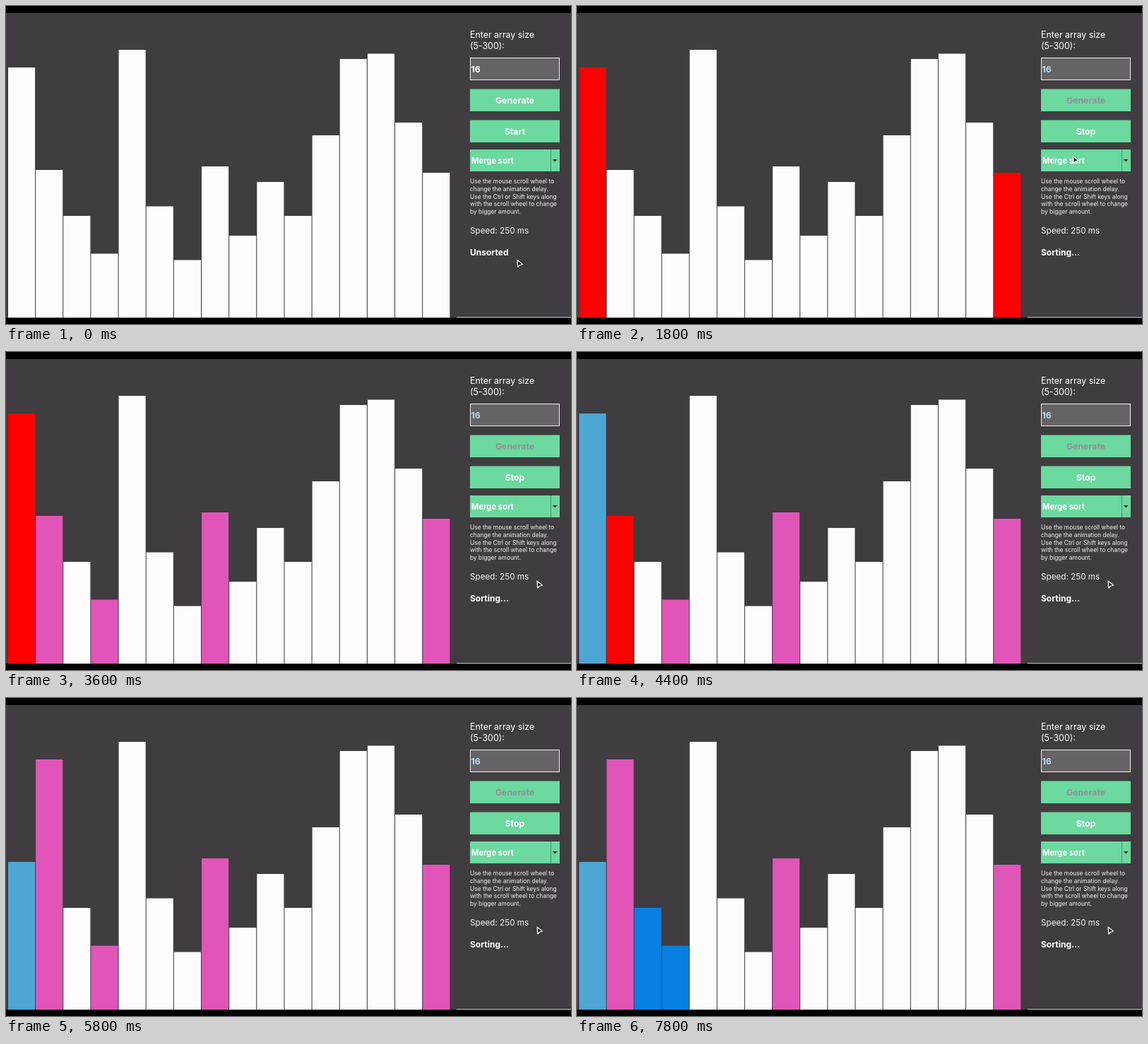
An HTML page with a canvas that plays this animation: 800x450 px, repeating every 8 s.

```html
<!DOCTYPE html>
<html lang="en">
<head>
<meta charset="utf-8">
<title>Merge sort visualizer</title>
<style>
  html, body { margin: 0; width: 100%; height: 100%; overflow: hidden; background: #000; }
  canvas { display: block; width: 800px; height: 450px; }
</style>
</head>
<body>
<canvas id="stage" width="800" height="450"></canvas>
<script>
const ctx = document.getElementById("stage").getContext("2d");

const LOOP = 8000, TICK = 200;
const SORT_START = 1500, STEP = 500;
const FLOOR = 441, PITCH = 39.15, BAR_W = 38.1;

const WHITE = "#fefcff", RED = "#ff0000", PINK = "#e155b9";
const SKY = "#4da6d4", BLUE = "#0780e2";
const PANEL = "#403d40", GREEN = "#6bd9a0", HOVER = "#4a9870";

const tops = [87, 232, 297, 350.5, 62, 283.5, 359.5, 227, 325, 249, 297, 183, 75, 67.5, 165, 236];
const START_BTN = { x: 657, y: 161.5, w: 127, h: 31.5 };

// Records one snapshot for every visible step of the sort.
function recordSteps(values) {
  const bars = values.map(top => ({ top, color: WHITE }));
  const steps = [];
  const snap = () => steps.push(bars.map(b => ({ ...b })));

  function sort(lo, hi) {
    const before = bars[lo].color;
    bars[lo].color = bars[hi].color = RED;
    snap();
    if (lo === hi) {
      bars[lo].color = before;
      return;
    }
    bars[lo].color = SKY;
    bars[hi].color = PINK;
    const mid = (lo + hi) >> 1;
    sort(lo, mid);
    sort(mid + 1, hi);
    merge(lo, hi);
  }

  function merge(lo, hi) {
    const part = bars.slice(lo, hi + 1);
    const colors = part.map(b => b.color);
    const sorted = part.map(b => b.top).sort((a, b) => b - a);
    part.forEach(b => { b.color = BLUE; });
    snap();
    part.forEach((b, i) => {
      b.top = sorted[i];
      b.color = colors[i];
      snap();
    });
  }

  sort(0, values.length - 1);
  return steps;
}

const steps = recordSteps(tops);
const idle = tops.map(top => ({ top, color: WHITE }));

function rect(x, y, w, h, color) {
  ctx.fillStyle = color;
  ctx.fillRect(x, y, w, h);
}

function label(text, x, y, size, { weight = 400, color = "#fff", align = "left" } = {}) {
  ctx.font = `${weight} ${size}px Inter, "Open Sans", sans-serif`;
  ctx.textAlign = align;
  ctx.fillStyle = color;
  ctx.fillText(text, x, y);
}

function button(text, y, h, fill, color = "#fff") {
  rect(657, y, 127, h, fill);
  label(text, 720.5, y + h / 2 + 4.6, 12.3, { weight: 700, color, align: "center" });
}

const ease = p => p * p * (3 - 2 * p);

function glide(t, from, to, begin, end) {
  const p = ease(Math.min(1, Math.max(0, (t - begin) / (end - begin))));
  return from.map((v, i) => v + (to[i] - v) * p);
}

function pointerAt(t) {
  const rest = [724, 359.5], press = [685, 173.5], away = [752, 324];
  return t < 1400 ? glide(t, rest, press, 200, 1100) : glide(t, press, away, 1500, 2400);
}

function drawPointer(x, y) {
  ctx.beginPath();
  [[0, 0], [0.8, 10], [3.4, 7.2], [7.4, 6]].forEach(([dx, dy]) => ctx.lineTo(x + dx, y + dy));
  ctx.closePath();
  ctx.fillStyle = "#111";
  ctx.fill();
  ctx.strokeStyle = "#fff";
  ctx.lineWidth = 1.2;
  ctx.lineJoin = "round";
  ctx.stroke();
}

function drawBars(bars) {
  bars.forEach((b, i) => rect(3 + i * PITCH, b.top, BAR_W, FLOOR - b.top, b.color));
}

function drawPanel(sorting, hover) {
  label("Enter array size", 657, 44.5, 12.4);
  label("(5-300):", 657, 61, 12.4);

  rect(657, 73, 127, 32, "#f2f0f2");
  rect(658, 74, 125, 30, "#656365");
  label("16", 658.5, 94, 12.3, { weight: 700, color: sorting ? "#bcd8ee" : "#fff" });

  button("Generate", 117.5, 31.5, GREEN, sorting ? "#958f94" : "#fff");
  button(sorting ? "Stop" : "Start", START_BTN.y, START_BTN.h, hover ? HOVER : GREEN);

  rect(657, 203, 127, 31, GREEN);
  rect(771, 203, 1, 31, "#4d8d6d");
  label("Merge sort", 659, 222.7, 11.2, { weight: 700 });
  ctx.beginPath();
  ctx.moveTo(774, 217);
  ctx.lineTo(780.5, 217);
  ctx.lineTo(777.25, 220.5);
  ctx.fillStyle = "#202820";
  ctx.fill();

  [
    "Use the mouse scroll wheel to",
    "change the animation delay.",
    "Use the Ctrl or Shift keys along",
    "with the scroll wheel to change",
    "by bigger amount."
  ].forEach((line, i) => label(line, 657, 251 + i * 10.8, 8.4, { color: "#f4f2f4" }));

  label("Speed: 250 ms", 657, 321.5, 11.7, { color: "#f4f2f4" });
  label(sorting ? "Sorting..." : "Unsorted", 657, 352.8, 12, { weight: 700 });
}

function draw(t) {
  const sorting = t >= SORT_START;
  const [px, py] = pointerAt(t);
  const b = START_BTN;
  const hover = px >= b.x && px <= b.x + b.w && py >= b.y && py <= b.y + b.h;

  rect(0, 0, 800, 450, "#000");
  rect(0, 10, 800, FLOOR - 10, PANEL);
  rect(638, 440, 162, 1, "#c9c7c9");
  drawBars(sorting ? steps[Math.floor((t - SORT_START) / STEP)] : idle);
  drawPanel(sorting, hover);
  drawPointer(px, py);
}

const origin = performance.now();
function frame() {
  const t = (performance.now() - origin) % LOOP;
  draw(Math.floor(t / TICK) * TICK);
  requestAnimationFrame(frame);
}
frame();
</script>
</body>
</html>
```
